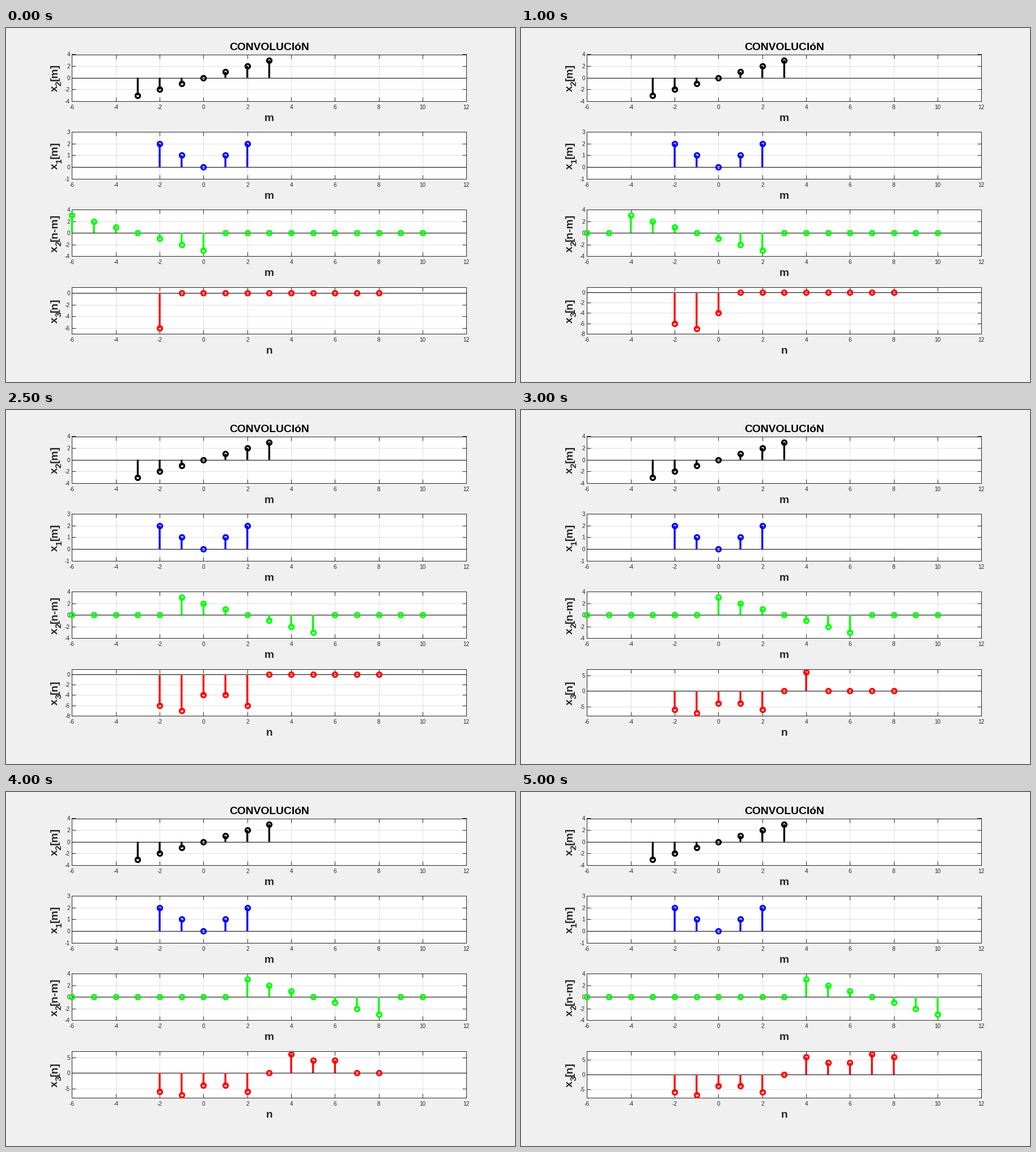
A matplotlib script that plays this animation: 898 by 624 pixels, repeating every 5500 ms.

```python
import numpy as np
import matplotlib.pyplot as plt
from matplotlib.animation import FuncAnimation

W, H, DPI = 898, 624, 64
PX = 72 / DPI  # points per pixel
LEFT, TOP, WIDTH, HEIGHT, PITCH = 116.44, 46.5, 695.95, 82.3, 136.75
GRAY = "#262626"
LABEL = 19.3

plt.rcParams.update({
    "font.family": "Liberation Sans",
    "font.size": 10 * PX,
    "axes.unicode_minus": False,
    "axes.linewidth": PX,
    "axes.edgecolor": GRAY,
})

fig = plt.figure(figsize=(W / DPI, H / DPI), dpi=DPI, facecolor="#f0f0f0")


def put(x, y, s, size=LABEL, color=GRAY, **kw):
    return fig.text(x / W, 1 - y / H, s, size=size * PX, color=color,
                    weight="bold", va="baseline", **kw)


def side_label(cy, sub, arg):
    """Rotated x_sub[arg], centred on cy."""
    parts = [put(x, cy, s, size, rotation=90, rotation_mode="anchor", ha="left")
             for x, s, size in ((91, "x", LABEL), (98, sub, 0.8 * LABEL),
                                (91, f"[{arg}]", LABEL))]
    sizes = [p.get_window_extent().height for p in parts]
    y = cy + sum(sizes) / 2
    for part, size in zip(parts, sizes):
        part.set_y(1 - y / H)
        y -= size


def panel(row, ylim, yticks, sub, arg, var):
    top = TOP + row * PITCH
    ax = fig.add_axes([LEFT / W, 1 - (top + HEIGHT) / H, WIDTH / W, HEIGHT / H])
    ax.set(xlim=(-6, 12), ylim=ylim, xticks=range(-6, 13, 2), yticks=yticks)
    ax.tick_params(direction="in", top=True, right=True, length=7 * PX,
                   width=PX, color=GRAY, labelcolor=GRAY)
    ax.tick_params(axis="x", pad=6 * PX)
    ax.tick_params(axis="y", pad=3.5 * PX)
    ax.grid(color="#dfdfdf", lw=PX)
    ax.set_axisbelow(True)
    ax.axhline(0, color="black", lw=PX, zorder=3)
    side_label(top + HEIGHT / 2, sub, arg)
    put(LEFT + WIDTH / 2, top + HEIGHT + 35, var, ha="center")
    return ax


class Stem:
    def __init__(self, ax, x, color):
        self.x = x
        lw = 3.33 * PX
        self.bars, = ax.plot([], [], color=color, lw=lw, zorder=5, snap=False,
                             solid_capstyle="butt", clip_on=False)
        self.dots, = ax.plot([], [], "o", ms=8 * PX, mew=lw, mec=color,
                             mfc="none", zorder=6, clip_on=False)

    def set(self, y):
        gap = np.full(len(y), np.nan)
        self.bars.set_data(np.repeat(self.x, 3),
                           np.column_stack([0 * y, y, gap]).ravel())
        self.dots.set_data(self.x, y)


m2, m1 = np.arange(-3, 4), np.arange(-2, 3)
m, n = np.arange(-6, 11), np.arange(-2, 9)
x3 = np.convolve(abs(m1), m2)

put(LEFT + WIDTH / 2, 39, "CONVOLUCIóN", color="black", ha="center")
even = range(-4, 5, 2)
ax2 = panel(0, (-4, 4), even, "2", "m", "m")
ax1 = panel(1, (-1, 3), range(-1, 4), "1", "m", "m")
ax_shift = panel(2, (-4, 4), even, "2", "n-m", "m")
ax3 = panel(3, (-7, 1), range(-6, 1, 2), "3", "n", "n")

Stem(ax2, m2, "black").set(m2)
Stem(ax1, m1, "blue").set(abs(m1))
shifted = Stem(ax_shift, m, "lime")
result = Stem(ax3, n, "red")


def update(k):
    y = k - 3 - m
    shifted.set(np.where(abs(y) <= 3, y, 0))
    y = np.where(np.arange(len(n)) <= k, x3, 0)
    result.set(y)
    lo, hi = y.min() - 1, y.max() + 1
    ax3.set_ylim(lo, hi)
    step = 2 if hi - lo < 10 else 5
    ax3.set_yticks([t for t in range(-10, 11, step if step == 5 else 2)
                    if lo <= t <= hi])


anim = FuncAnimation(fig, update, frames=len(n), interval=500,
                     repeat=True, repeat_delay=0, blit=False)
plt.show()
```
